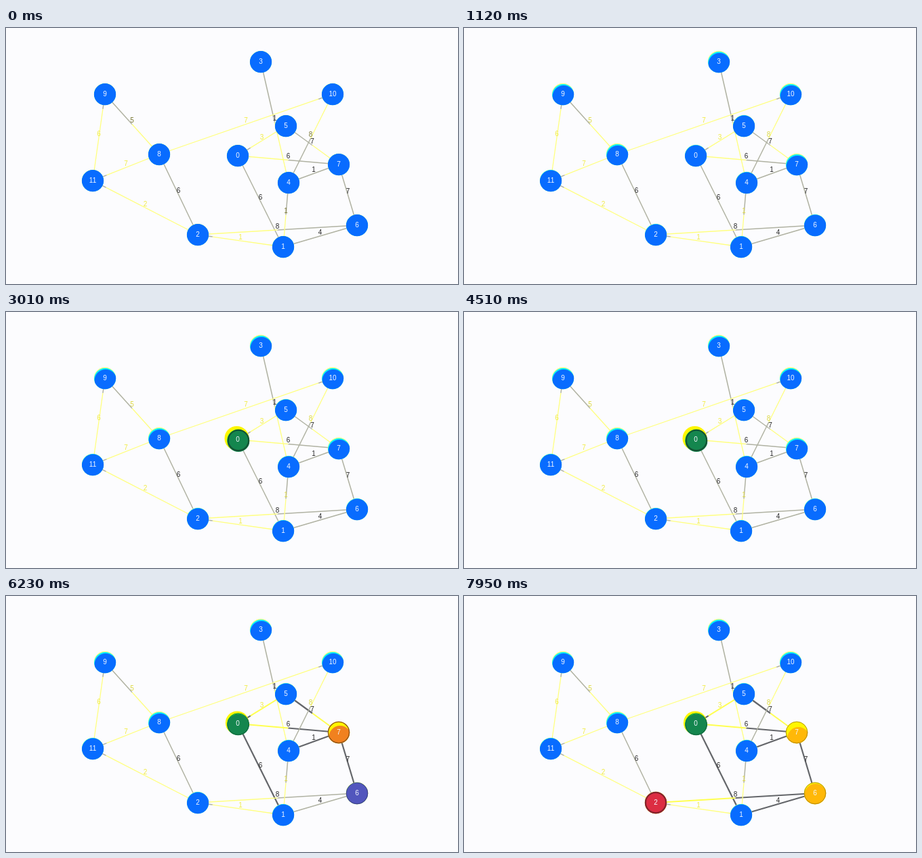
These frames come from a looping animation (667 px wide and 379 px high, 8 s). An HTML page with a canvas:

```html
<!DOCTYPE html>
<html lang="en">
<head>
<meta charset="utf-8">
<title>Graph search</title>
<style>
html, body { margin: 0; width: 100%; height: 100%; overflow: hidden; background: #fcfcfe; }
canvas { display: block; }
</style>
</head>
<body>
<canvas id="stage" width="667" height="379"></canvas>
<script>
const LOOP = 8000;
const ctx = document.getElementById('stage').getContext('2d');

const BLUE = [8, 108, 255], GREEN = [20, 134, 78], RED = [220, 45, 66], ORANGE = [255, 184, 8];
const CYAN = [0, 240, 255], LIME = [40, 255, 62], YELLOW = [255, 246, 0], WHITE = [245, 248, 255];
const PALE = [255, 255, 128], GREY = [176, 178, 162], DARK = [100, 102, 106];
const INK = [40, 40, 40], STRAW = [240, 235, 70];

const nodes = '342,189 409,324 283,306 376,50 417,229 413,145 518,292 491,202 226,187 146,98 482,98 128,226'
  .split(' ').map(s => s.split(',').map(Number));
const loose = [3, 7, 8, 9, 10];   // these show a wider bright rim

// "from-to:weight"; two-tone edges start at their yellow end
const edges = [
  ['grey', '0-1:6 4-7:1 1-6:4 8-2:6 7-6:7'],
  ['half', '4-3:1 7-5:7 0-7:6 2-6:8'],
  ['fade', '10-4:8 1-4:1 8-9:5'],
  ['yellow', '5-0:3 1-2:1 2-11:2 11-9:6 8-11:7 8-10:7']
].flatMap(([tone, list]) => list.split(' ').map(s => {
  const [a, b, weight] = s.split(/[-:]/).map(Number);
  return { a, b, weight, tone };
}));

// The search visits these nodes in turn; each visit lights its edges
const path = [0, 7, 6, 2];
const stepAt = k => 4510 + 1250 * k;
const litAt = ({ a, b }) => stepAt(Math.min(...[a, b].map(n => (path.indexOf(n) + 9) % 9 || 0)
  .map((k, j) => path.includes([a, b][j]) ? k : 9)));

const mix = (a, b, p) => a + (b - a) * p;
const blend = (a, b, p) => a.map((v, i) => mix(v, b[i], p));
const rgb = c => `rgb(${c.map(Math.round)})`;
const prog = (t, from, length) => Math.min(1, Math.max(0, (t - from) / length));

function circle(x, y, r) {
  ctx.beginPath();
  ctx.arc(x, y, r, 0, 7);
}

function disc(x, y, r, color) {
  circle(x, y, r);
  ctx.fillStyle = rgb(color);
  ctx.fill();
}

function text(str, x, y, color) {
  ctx.fillStyle = rgb(color);
  ctx.fillText(str, x, y);
}

function drawEdge(edge, t) {
  const [ax, ay] = nodes[edge.a], [bx, by] = nodes[edge.b];
  const lit = prog(t, litAt(edge), 450);
  const ends = { grey: 0, yellow: 1 - 22 / Math.hypot(bx - ax, by - ay) };
  const split = ends[edge.tone] ?? .5;
  const part = (p, q, color, width) => {
    ctx.strokeStyle = rgb(color);
    ctx.lineWidth = width + .7 * lit;
    ctx.beginPath();
    ctx.moveTo(mix(ax, bx, p), mix(ay, by, p));
    ctx.lineTo(mix(ax, bx, q), mix(ay, by, q));
    ctx.stroke();
  };
  part(0, split, blend(PALE, [255, 255, 80], lit), 1.3);
  part(split, 1, blend(GREY, DARK, lit), 1.5);
}

function drawWeight({ a, b, weight, tone }, settle) {
  const gold = { yellow: 1, fade: mix(.4, .9, settle) }[tone] ?? 0;
  const x = (nodes[a][0] + nodes[b][0]) / 2, y = (nodes[a][1] + nodes[b][1]) / 2;
  text(weight, x, y - 5, blend(INK, STRAW, gold));
}

function drawNode([x, y], i, t, settle) {
  const k = path.indexOf(i), first = k === 0, onPath = k >= 0;
  const found = !onPath ? 0 : first ? prog(t, 2820, 180) : prog(t, stepAt(k - 1) + 290, 520);
  const passed = onPath ? prog(t, stepAt(k), 780) : 0;

  let fill = blend(BLUE, first ? GREEN : RED, found);
  if (!first) fill = blend(fill, ORANGE, passed);
  const rim = blend(CYAN, first ? LIME : YELLOW, found);
  const halo = blend(PALE, YELLOW, found);
  const grow = first ? found * (1 - .4 * passed) : 0;
  const drift = mix(.5, loose.includes(i) ? 3.4 : 1, settle) * (first ? 1 : 1 + 1.5 * passed) + 2 * grow;

  // Halo, rim and body overlap, each slid further down inside the node
  disc(x - 1.5 * grow, y - 2 * grow, 16.2 + 1.8 * grow, halo);
  ctx.save();
  circle(x + grow, y + grow, 16.2 + .8 * grow);
  ctx.clip();
  disc(x + drift * .1, y + drift * .35, 16.3, rim);
  disc(x + drift * .3, y + drift, 16.4, fill);
  ctx.restore();

  const width = found * mix(2.2, .7, passed);
  if (width) {
    circle(x + grow, y + grow, 16.2 - width / 2);
    ctx.strokeStyle = rgb(blend(fill, [20, 20, 20], .45));
    ctx.lineWidth = width;
    ctx.stroke();
  }
  text(i, x, y, WHITE);
}

function draw(now) {
  const t = now % LOOP;
  const settle = prog(t, 300, 270);
  ctx.fillStyle = '#fcfcfe';
  ctx.fillRect(0, 0, 667, 379);
  ctx.font = '10px "Liberation Sans", Arial, sans-serif';
  ctx.textAlign = 'center';
  ctx.textBaseline = 'middle';
  edges.forEach(e => drawEdge(e, t));
  edges.forEach(e => drawWeight(e, settle));
  nodes.forEach((n, i) => drawNode(n, i, t, settle));
}

const began = performance.now();
function tick() {
  draw(performance.now() - began);
  requestAnimationFrame(tick);
}
tick();
</script>
</body>
</html>
```
